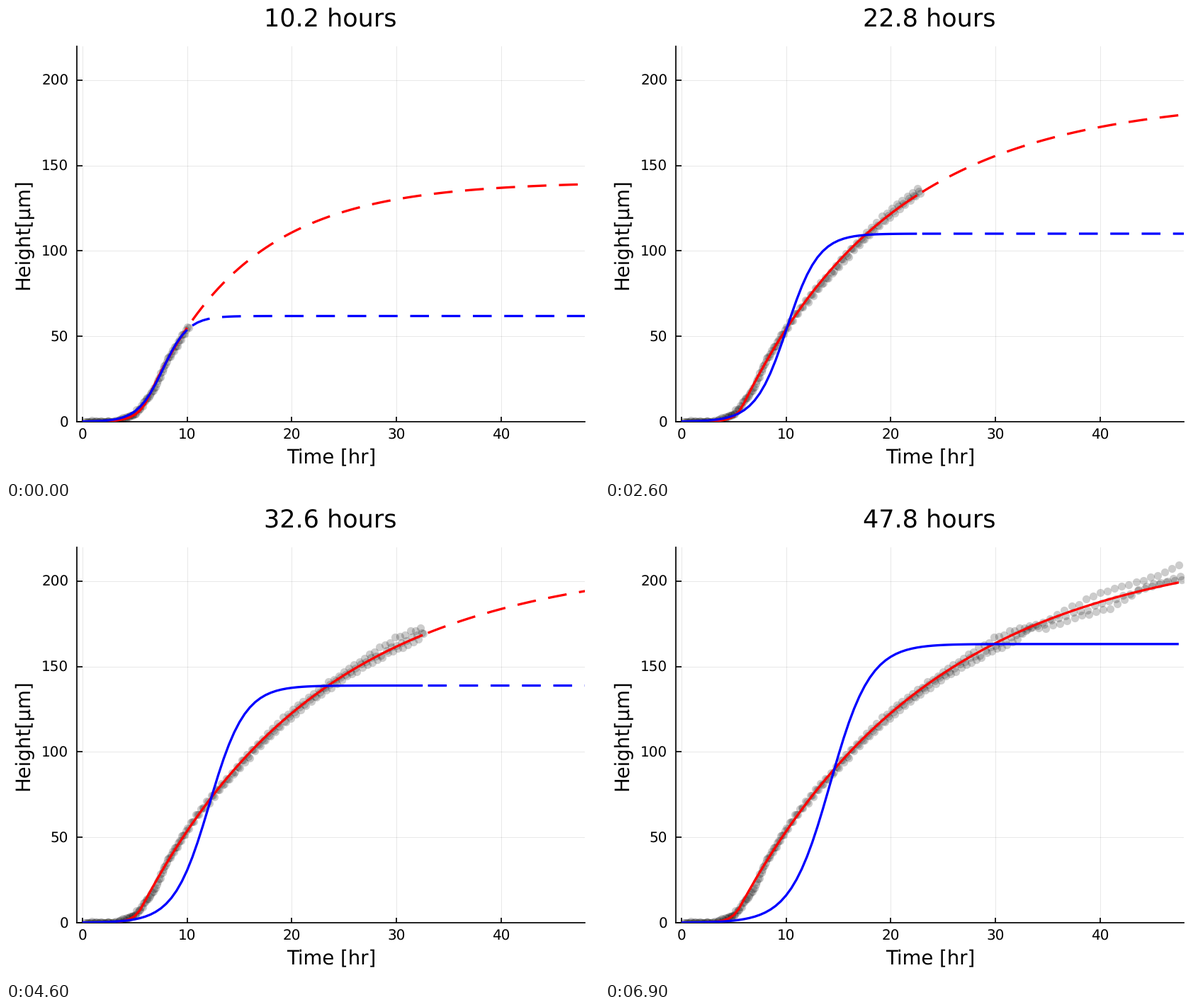
A matplotlib script that plays this animation: 837x669 px, repeating every 7 s.

```python
import numpy as np
import matplotlib
import matplotlib.pyplot as plt
from matplotlib.animation import FuncAnimation

W, H = 837, 669
FRAMES, INTERVAL = 70, 100
matplotlib.rcParams.update({"font.family": "DejaVu Sans", "text.hinting": "none"})

# Plot area in pixels, measured from the top left
LEFT, RIGHT, TOP, BOTTOM = 100.4, 817.2, 56.6, 588.0
X_LIM, Y_LIM = (-0.5, 48), (0, 220)
LINE, AXIS = 3.3, 1.7
DASHES = (0, (26.55 / LINE, 17.7 / LINE))

# Hour of the fit, plateau of the blue curve, plateau of the red curve
PLATEAUS = np.array([
    (10.2, 61.9, 140.6), (14.0, 76.8, 153.8), (19.9, 100.4, 180.4),
    (26.2, 121.4, 200.2), (32.6, 139.0, 212.3), (38.9, 150.0, 214.5),
    (47.8, 163.2, 222.7),
])


def ramp(t, start):
    return np.maximum(t - start, 0)


def bump(t, center, width):
    return np.exp(-((t - center) / width) ** 2)


def plateau(hour, column):
    return np.interp(hour, PLATEAUS[:, 0], PLATEAUS[:, column])


def logistic(t, hour):
    cap = plateau(hour, 1)
    rate = 0.46 + 0.58 * np.exp(-hour / 22)
    gain = cap - 61.9
    mid = 7.7 + 0.036 * gain + 0.00028 * gain ** 2
    return cap / (1 + np.exp(-rate * (t - mid)))


def interface(t, hour):
    """Exponential growth up to the layer height, then slow saturation."""
    final = plateau(hour, 2)
    age = max(hour - 10.2, 0)
    h10 = 53.5 + 1.5 * bump(age, 0, 15)
    h20 = 122.8 - 12 * np.exp(-(age / 6.2) ** 1.3)
    layer = 9 + 5 * np.exp(-age / 8)
    decay = np.log((final - h10) / (final - h20)) / 10
    t1 = 10 - np.log((final - layer) / (final - h10)) / decay
    growth = decay * (final - layer) / layer
    early = layer * np.exp(growth * np.minimum(t - t1, 0))
    late = final - (final - layer) * np.exp(-decay * (t - t1))
    return np.where(t < t1, early, late)


# How each replicate strays from the last fit
def upper(t):
    wave = np.cos(2 * np.pi * (t - 34.7) / 10.3)
    return 0.06 * t + 0.75 * ramp(t, 38) - 1.6 * wave * np.minimum(t / 34, 1) ** 2


def middle(t):
    return -0.04 * t + 0.65 * ramp(t, 40)


def lower(t):
    recovery = 2.3 * (ramp(t, 41) - ramp(t, 44.3))
    return -0.13 * t + 4 * bump(t, 33.2, 0.8) + recovery


def measurements():
    """Three replicates, sampled shortly after one another."""
    rng = np.random.default_rng(4)
    ends = np.concatenate([np.arange(0.5, 10, 0.33), clock])
    times, heights = [], []
    for lag, stray in ((0.27, upper), (0.13, middle), (0, lower)):
        t = ends - lag
        shared = bump(t, 4.4, 0.8) - 3 * bump(t, 6.8, 1) + 1.6 * bump(t, 10.5, 2)
        noise = rng.normal(0, 0.4, t.size)
        h = interface(t, clock[-1]) + shared + stray(t) + noise
        times.append(t)
        heights.append(np.maximum(h, 0))
    return np.concatenate(times), np.concatenate(heights)


def label(x, y, text, size, **kw):
    kw = {"ha": "center", "va": "baseline", **kw}
    return fig.text(x / W, 1 - y / H, text, fontsize=size, **kw)


def to_px(x, y):
    fx = (x - X_LIM[0]) / (X_LIM[1] - X_LIM[0])
    return LEFT + fx * (RIGHT - LEFT), BOTTOM - y / Y_LIM[1] * (BOTTOM - TOP)


# At 72 dpi one point is one pixel
fig = plt.figure(figsize=(W / 72, H / 72), dpi=72, facecolor="white")
ax = fig.add_axes([LEFT / W, 1 - BOTTOM / H, (RIGHT - LEFT) / W, (BOTTOM - TOP) / H])
ax.set(xlim=X_LIM, ylim=Y_LIM, xticks=range(0, 41, 10), yticks=range(0, 201, 50))
ax.set_axisbelow(True)
ax.grid(color="black", alpha=0.1, lw=0.9)
ax.tick_params(direction="in", length=7.5, width=AXIS, labelbottom=False, labelleft=False)
ax.spines[["top", "right"]].set_visible(False)
ax.spines[["left", "bottom"]].set_linewidth(AXIS)

for v in range(0, 41, 10):
    label(to_px(v, 0)[0], 613, str(v), 20)
for v in range(0, 201, 50):
    label(88.3, to_px(0, v)[1] + 7.3, str(v), 20, ha="right")
label(459.5, 646, "Time [hr]", 27.5)
label(32.2, 322.3, "Height[µm]", 27.5, rotation=90, rotation_mode="anchor")
title = label(457.8, 30, "", 35)

# Sampling gets slower late in the loop
steps = np.arange(FRAMES)
clock = 10.152 + 0.487 * steps + 0.197 * ramp(steps, 48.5)
data_t, data_h = measurements()
grid_t = np.arange(0, 48.1, 0.5)

dots, = ax.plot([], [], "o", ms=11.2, color="black", alpha=0.2, mew=0, zorder=2)
curves = []
for model, color, z in ((interface, "red", 3), (logistic, "blue", 4)):
    solid, = ax.plot([], [], color=color, lw=LINE, solid_capstyle="butt", zorder=z)
    dashed, = ax.plot([], [], color=color, lw=LINE, ls=DASHES,
                      dash_capstyle="butt", zorder=z)
    curves.append((model, solid, dashed))


def update(i):
    hour = clock[i]
    title.set_text(f"{hour:.1f} hours")
    seen = data_t <= hour
    dots.set_data(data_t[seen], data_h[seen])
    past = grid_t <= hour
    for model, solid, dashed in curves:
        h = model(grid_t, hour)
        solid.set_data(grid_t[past], h[past])
        dashed.set_data(grid_t[~past], h[~past])
    return [title, dots] + [line for c in curves for line in c[1:]]


anim = FuncAnimation(fig, update, frames=FRAMES, interval=INTERVAL,
                     init_func=lambda: update(0), repeat=True, repeat_delay=0)
plt.show()
```
